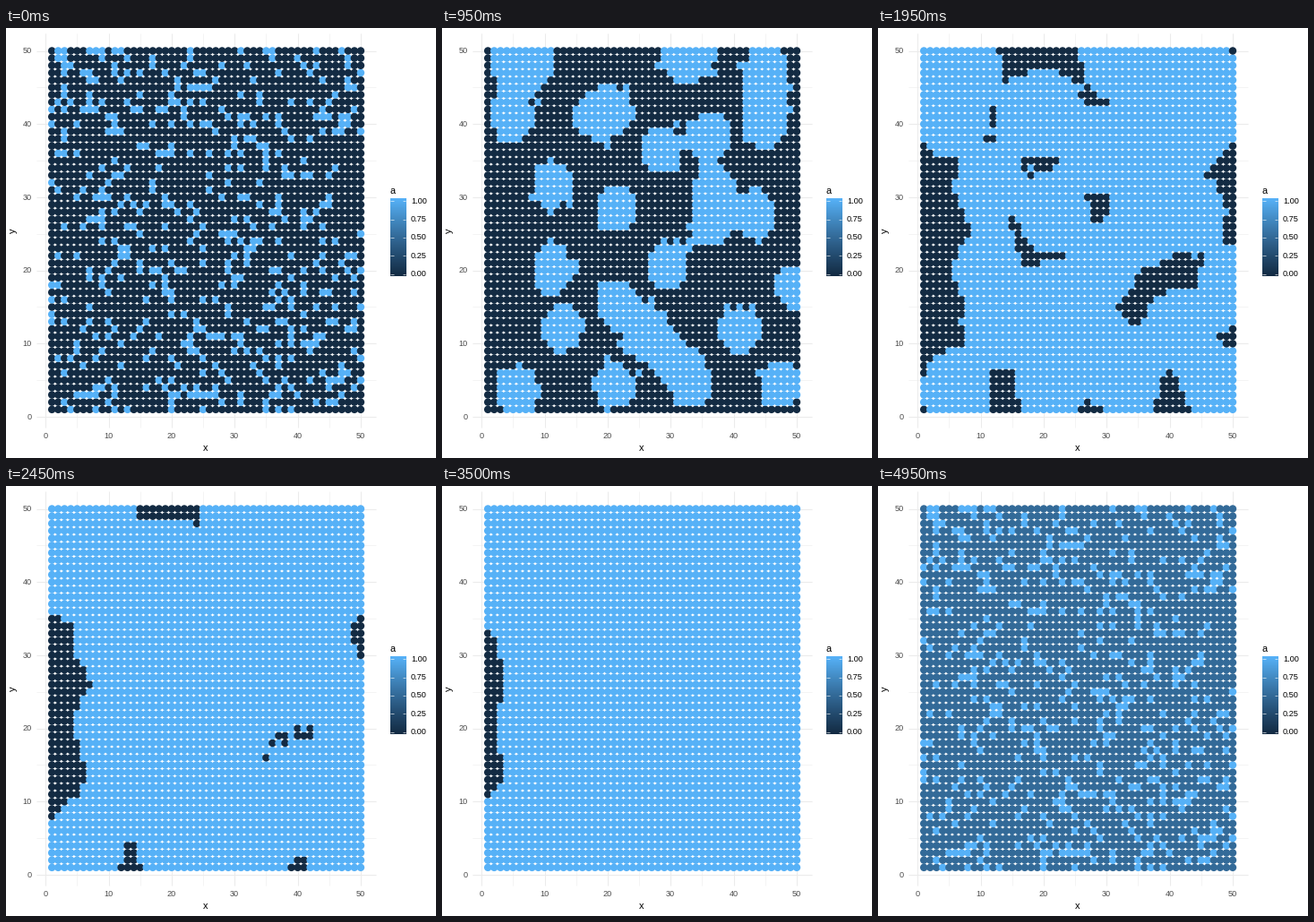
Write a matplotlib script that moves like this. It is 480x480 px and loops after 5000 ms.

```python
import numpy as np
import matplotlib.pyplot as plt
from matplotlib.animation import FuncAnimation
from matplotlib.colors import LinearSegmentedColormap

SIZE, DPI = 480, 80
PT = 72 / DPI  # points per pixel
N = 50
FRAMES, INTERVAL = 100, 50
STEPS = 11
FONT = "Liberation Sans"

BLUES = LinearSegmentedColormap.from_list(
    "blues", ["#132B43", "#22496C", "#336A98", "#448DC6", "#56B1F7"])

# Centres from which the light colonies grow
CENTRES = [
    (4.7, 48.4), (8, 47.8), (5, 41), (18, 41.2), (20.8, 41.6),
    (31.4, 49.3), (34, 49.4), (45, 47.3), (44.9, 43.6), (44.9, 39.8),
    (28.6, 36.6), (36.2, 38.6), (36.8, 31), (36.6, 26.3), (43.6, 27.8),
    (11.4, 31.8), (21.5, 28.2), (11.2, 20.2), (29.3, 20.6), (12.8, 12.1),
    (21.7, 15.4), (25.6, 12), (29.4, 8.6), (21.1, 4.2), (33.1, 5),
    (41.1, 11.8), (47.3, 4.4), (49.8, 17.8), (5.9, 3.7),
]
RADIUS = 3.4

gx, gy = np.meshgrid(np.arange(1, N + 1), np.arange(1, N + 1))


def colony_distance():
    """Soft minimum of the distances to all colonies, in cells."""
    pull = sum(np.exp(RADIUS - np.hypot(gx - x, gy - y)) for x, y in CENTRES)
    return -np.log(pull)


def make_states():
    """Random cells first, then colonies spreading at a steady rate."""
    dist = colony_distance()
    rng = np.random.default_rng(12)
    start = rng.random(gx.shape) < np.where(dist < 0, 0.23, 0.16)
    states = [start]
    for k in range(1, STEPS):
        reach = 1.1 * k - 2.4
        states.append(dist < reach + start * 1.5 / k)
    states[-1] = np.ones_like(start)
    return [s.ravel().astype(float) for s in states]


STATES = make_states()
STARTS = [round(FRAMES * k / STEPS) for k in range(STEPS + 1)]


def values(frame):
    """Hold each state, with one blended step before the next one."""
    k = max(i for i, s in enumerate(STARTS) if s <= frame)
    if frame + 1 == STARTS[k + 1]:
        return (STATES[k] + STATES[(k + 1) % STEPS]) / 2
    return STATES[k]


def px(x):
    return 44.2 + 7.035 * x


def py(y):
    return 434 - 8.17 * y


fig = plt.figure(figsize=(SIZE / DPI, SIZE / DPI), dpi=DPI, facecolor="white")
ax = fig.add_axes([0, 0, 1, 1])
ax.axis("off")


def label(x, y, text, size=9.2, color="#4D4D4D", **kw):
    kw = {"ha": "center", "va": "center_baseline", **kw}
    ax.text(x, y, text, fontsize=size * PT, color=color, family=FONT, **kw)


def line(xs, ys, width, color="#EBEBEB", z=1):
    ax.plot(xs, ys, color=color, lw=width * PT, zorder=z,
            solid_capstyle="butt")


LEFT, RIGHT, TOP, BOTTOM = 33.9, 413, 5.5, 446
for t in range(0, 51, 5):
    width = 0.53 if t % 10 else 1.07
    line([px(t)] * 2, [TOP, BOTTOM], width)
    line([LEFT, RIGHT], [py(t)] * 2, width)
    if t % 10 == 0:
        label(px(t), 454, str(t))
        label(29, py(t) - 0.7, str(t), ha="right")
label(222.5, 468.5, "x", 11, "black")
label(8, 226, "y", 11, "black", rotation=90, va="center")

# Legend
label(428.5, 181, "a", 11, "black", ha="left")
ramp = np.linspace(1, 0, 87)[:, None]
ax.imshow(ramp, cmap=BLUES, extent=(429, 446.3, 277.2, 190.8),
          aspect="auto", interpolation="bilinear", zorder=2)
for i in range(5):
    y = 274.8 - 20.4 * i
    line([429, 432.5], [y, y], 0.6, "white", 3)
    line([442.8, 446.3], [y, y], 0.6, "white", 3)
    label(452, y - 1.2, f"{i / 4:.2f}", color="black", ha="left")

dots = ax.scatter(px(gx.ravel()), py(gy.ravel()), s=(8.5 * PT) ** 2,
                  c=BLUES(STATES[0]), linewidths=0, zorder=4)
ax.set_xlim(0, SIZE)
ax.set_ylim(SIZE, 0)


def draw(frame):
    dots.set_facecolors(BLUES(values(frame)))
    return [dots]


anim = FuncAnimation(fig, draw, frames=FRAMES, interval=INTERVAL,
                     repeat=True, repeat_delay=0)
plt.show()
```
